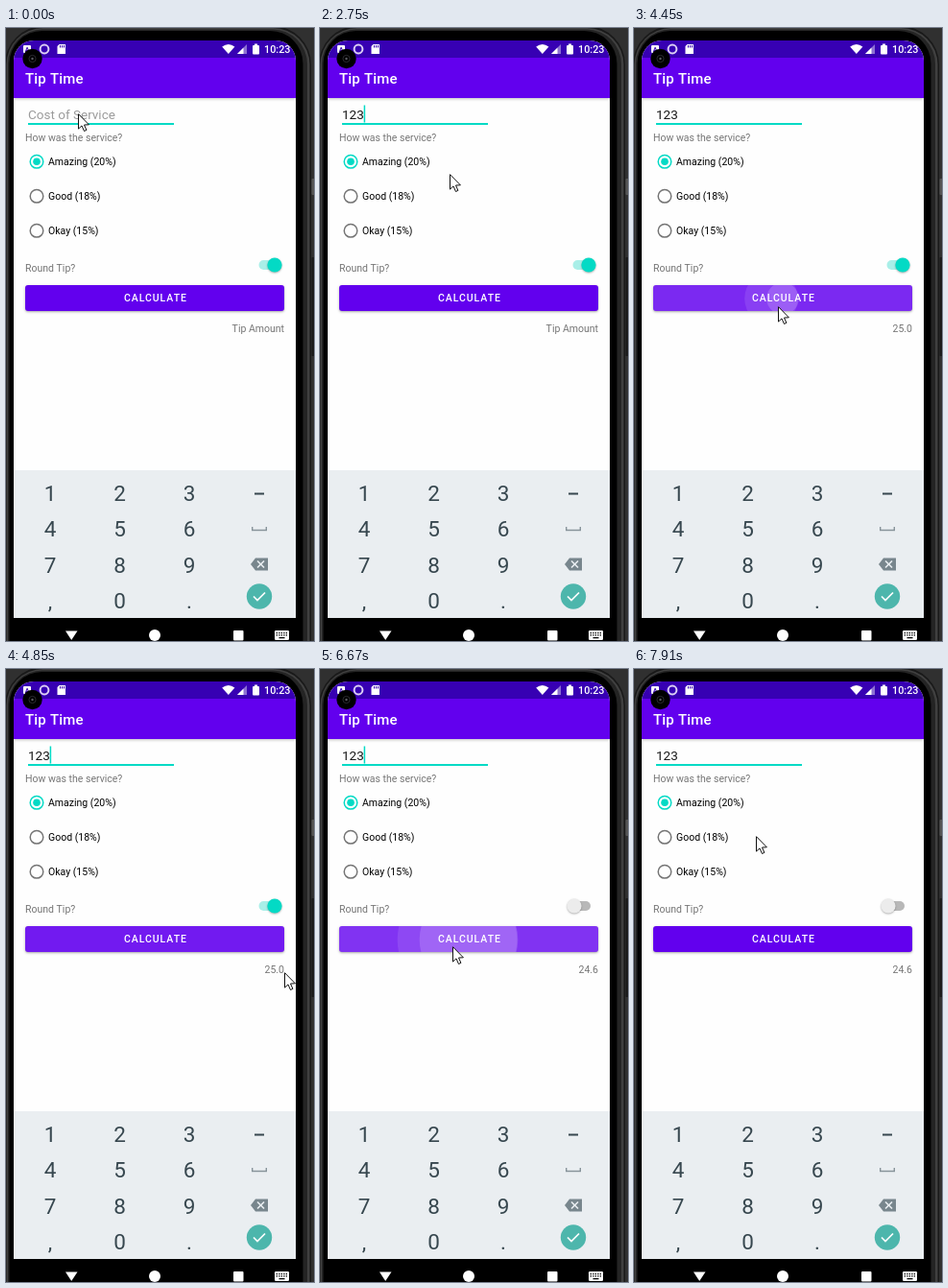
An HTML page with a canvas that plays this animation: 321 by 639 pixels, repeating every 8000 ms.

```html
<!DOCTYPE html>
<html lang="en">
<head>
<meta charset="utf-8">
<title>Tip Time</title>
<style>
  html, body { margin: 0; width: 100%; height: 100%; overflow: hidden; background: #303030; }
  canvas { display: block; width: 321px; height: 639px; }
</style>
</head>
<body>
<canvas id="stage"></canvas>
<script>
const W = 321, H = 639, LOOP = 8000, BEAT = LOOP / 60;
const TYPE_TWO = 1350, TYPE_THREE = 1650, PRESS_ONE = 4330, PRESS_TWO = 6400, TOGGLE = 5860;
const TEAL = '#03dac5', PURPLE = '#6200ee', GREY = '#757575', SLATE = '#37474f', KEYS = '#eaeef1';
const canvas = document.getElementById('stage');
const ctx = canvas.getContext('2d');
const dpr = window.devicePixelRatio || 1;
canvas.width = W * dpr;
canvas.height = H * dpr;

// Pointer stops: beat of arrival, beats of travel, x, y.
const stops = [
  [0, 1, 75, 89], [19, 1, 157, 100], [20, 1, 135, 152], [22, 2, 124, 174], [27, 3, 281, 248],
  [32, 3, 150, 290], [36, 1, 290, 316], [39, 3, 273, 248], [46, 4, 138, 289],
  [55, 5, 276, 321], [59, 2, 127, 174]
];

const clamp = v => Math.max(0, Math.min(1, v));
const smooth = v => v * v * (3 - 2 * v);
const mix = (a, b, k) => a + (b - a) * k;
const white = alpha => `rgba(255,255,255,${alpha})`;

// The pointer moves in beats, so it jumps from pose to pose.
function pointerAt(t) {
  const beat = Math.floor((t - 40) / BEAT);
  let [, , x, y] = stops[0];
  for (const [arrive, travel, toX, toY] of stops) {
    const k = smooth(clamp((beat - arrive + travel) / travel));
    x = mix(x, toX, k);
    y = mix(y, toY, k);
  }
  return [x, y];
}

// Each edit restarts the blink.
function caretOn(t) {
  const period = 947;
  const edit = t < TYPE_TWO ? 120 - period : t < TYPE_THREE ? TYPE_TWO : TYPE_THREE;
  return (t - edit) % period < 500;
}

function fillPath(fill) {
  ctx.fillStyle = fill;
  ctx.fill();
}

function strokePath(width, color) {
  ctx.lineWidth = width;
  ctx.strokeStyle = color;
  ctx.stroke();
}

function rect(x, y, w, h, fill) {
  ctx.fillStyle = fill;
  ctx.fillRect(x, y, w, h);
}

function box(x, y, w, h, r, fill) {
  ctx.beginPath();
  ctx.roundRect(x, y, w, h, r);
  fillPath(fill);
}

function circle(x, y, r) {
  ctx.beginPath();
  ctx.arc(x, y, r, 0, Math.PI * 2);
}

function disc(x, y, r, fill) {
  circle(x, y, r);
  fillPath(fill);
}

function ring(x, y, r, width, color) {
  circle(x, y, r);
  strokePath(width, color);
}

function trace(points) {
  ctx.beginPath();
  points.forEach(([x, y]) => ctx.lineTo(x, y));
}

function poly(points, fill) {
  trace(points);
  ctx.closePath();
  fillPath(fill);
}

function line(points, width, color) {
  trace(points);
  strokePath(width, color);
}

function text(str, x, y, { size = 10.5, weight = 400, color = '#000', align = 'left', space = 0 } = {}) {
  ctx.font = `${weight} ${size}px Roboto, sans-serif`;
  ctx.letterSpacing = space + 'px';
  ctx.textAlign = align;
  ctx.fillStyle = color;
  ctx.fillText(str, x, y);
}

function shadow(blur, y, alpha, draw) {
  ctx.save();
  ctx.shadowBlur = blur * dpr;
  ctx.shadowOffsetY = y * dpr;
  ctx.shadowColor = `rgba(0,0,0,${alpha})`;
  draw();
  ctx.restore();
}

function drawPhone() {
  rect(0, 0, W, H, '#303030');
  box(-1, -2, 319, 700, 40, '#191919');
  box(.5, 0, 316, 700, 38, '#404040');
  box(2, 1.5, 312, 700, 36, '#242424');
  box(3.5, 3, 306, 700, 34, '#000');
  box(318.5, 157, 3, 17, 1, '#555');
  box(318.5, 239, 3, 103, 1, '#1a1a1a');
}

function drawStatus() {
  rect(8, 13, 294, 18, '#3700b3');
  box(18, 18, 8, 8, 1, '#fff');
  text('A', 22, 25, { size: 7, weight: 700, color: '#3700b3', align: 'center' });
  ring(40, 22, 4.4, 2, '#dccff5');
  poly([[55.5, 17], [62, 17], [62, 27], [53.5, 27], [53.5, 19]], '#fff');
  for (let i = 0; i < 3; i++) rect(56 + i * 2, 18, 1, 2.5, '#3700b3');

  ctx.beginPath();
  ctx.moveTo(231.8, 27);
  ctx.lineTo(225.2, 19.5);
  ctx.quadraticCurveTo(231.8, 14.5, 238.4, 19.5);
  fillPath('#fff');
  poly([[241, 27], [251, 27], [251, 17]], '#8d70d3');
  poly([[241, 27], [247.5, 27], [247.5, 20.5]], '#fff');
  box(257, 18, 7, 9.5, 1, '#fff');
  rect(259, 16.5, 3, 2, '#fff');
  text('10:23', 296.5, 26, { size: 10.8, weight: 500, color: '#fff', align: 'right' });
}

function drawAppBar() {
  shadow(3, 1, .25, () => rect(8, 31, 294, 42, PURPLE));
  text('Tip Time', 20, 58, { size: 15, weight: 500, color: '#fff', space: .2 });
}

function drawCamera() {
  const x = 27.5, y = 32;
  disc(x, y, 10.2, '#000');
  ring(x, y, 3.6, 1, '#2b2b30');
  disc(x, y, 1.2, '#5c5c64');
}

function drawField(t) {
  const value = '123'.slice(0, t < TYPE_TWO ? 0 : t < TYPE_THREE ? 2 : 3);
  text(value || 'Cost of Service', 23, 94.7, { size: 13.5, color: value ? '#161616' : '#9b9b9b' });
  rect(23, 99, 152, 2, TEAL);
  if (caretOn(t)) rect(23 + value.length * 7.55, 80.5, 1.5, 18, TEAL);
}

function drawOptions() {
  text('How was the service?', 20, 118, { color: GREY });
  ['Amazing (20%)', 'Good (18%)', 'Okay (15%)'].forEach((label, i) => {
    const y = 139.3 + i * 36;
    ring(32, y, 6.8, 1.5, i ? GREY : TEAL);
    if (!i) disc(32, y, 3.8, TEAL);
    text(label, 44, y + 4);
  });
}

function drawSwitch(t) {
  const off = smooth(clamp((t - TOGGLE) / 120));
  text('Round Tip?', 20, 254, { color: GREY });
  box(263.5, 242, 18.5, 10, 5, off < .5 ? '#a9efe8' : '#b8b8b8');
  shadow(2, .8, .3, () => disc(280 - off * 15, 247, 7.6, off < .5 ? TEAL : '#ececec'));
}

function ripple(age, x, alpha) {
  if (age > 0) disc(x, 282, age * .23, white(alpha * clamp((450 - age) / 150)));
}

function drawButton(t) {
  const face = fill => box(20, 268, 270, 27, 3, fill);
  shadow(2.5, 1, .35, () => face(PURPLE));
  const age = t - (t < PRESS_TWO ? PRESS_ONE : PRESS_TWO);
  if (age >= 0) face(white(.2 * clamp(.4 + age / 300) * clamp((750 - age) / 450)));

  ctx.save();
  ctx.beginPath();
  ctx.roundRect(20, 268, 270, 27, 3);
  ctx.clip();
  ripple(age, 143, .1);
  ripple(age - 48, 155, .16);
  ctx.restore();

  text('CALCULATE', 123, 285.3, { weight: 500, color: '#fff', space: .94 });
  const result = t < PRESS_ONE + 120 ? 'Tip Amount' : t < PRESS_TWO + 120 ? '25.0' : '24.6';
  text(result, 290, 317, { color: GREY, align: 'right' });
}

function drawKeypad() {
  rect(8, 461, 294, 154, KEYS);
  ['123', '456', '789', ',0.'].forEach((row, r) => [...row].forEach((key, c) =>
    text(key, 46 + c * 72.5, 493 + r * 37.4, { size: 22.5, color: SLATE, align: 'center' })));
  rect(259, 484.5, 10, 2, SLATE);
  line([[256.7, 520], [256.7, 523.5], [271.3, 523.5], [271.3, 520]], 1.4, '#87939a');
  poly([[255, 559], [260, 552.5], [273, 552.5], [273, 565.5], [260, 565.5]], '#78868d');
  for (const s of [-1, 1]) line([[265.5 - 3.5 * s, 555.5], [265.5 + 3.5 * s, 562.5]], 1.6, KEYS);
  disc(264, 592.5, 13.2, '#4db6ac');
  line([[258, 592.5], [262, 596.5], [270, 588.5]], 1.7, '#fff');
}

function drawNav() {
  rect(8, 615, 294, 24, '#000');
  poly([[62, 628.5], [74.5, 628.5], [68.2, 638]], '#fff');
  disc(155, 633, 6, '#fff');
  box(237, 628, 10.5, 10.5, 1, '#fff');
  box(280, 628, 15, 10, 1.2, '#fff');
  for (let i = 0; i < 10; i++) {
    rect(281.7 + i % 5 * 2.5, i < 5 ? 630 : 632.3, 1.3, 1.3, '#000');
  }
  rect(284.5, 635, 6, 1.3, '#000');
}

function drawPointer(x, y) {
  ctx.save();
  ctx.translate(x + .5, y + .7);
  poly([[0, 0], [0, 15.4], [3.5, 12.2], [6, 17.8], [8.4, 16.7], [6, 11.3], [10.9, 11.1]], '#fff');
  strokePath(1, '#111');
  ctx.restore();
}

function render(t) {
  ctx.setTransform(dpr, 0, 0, dpr, 0, 0);
  drawPhone();
  ctx.save();
  ctx.beginPath();
  ctx.roundRect(8, 13, 294, 640, [21, 21, 0, 0]);
  ctx.clip();
  rect(8, 13, 294, 626, '#fefefe');
  drawAppBar();
  drawStatus();
  drawField(t);
  drawOptions();
  drawSwitch(t);
  drawButton(t);
  drawKeypad();
  drawNav();
  ctx.restore();
  drawCamera();
  drawPointer(...pointerAt(t));
}

const origin = performance.now();
function tick() {
  render((performance.now() - origin) % LOOP);
  requestAnimationFrame(tick);
}
tick();
</script>
</body>
</html>
```
